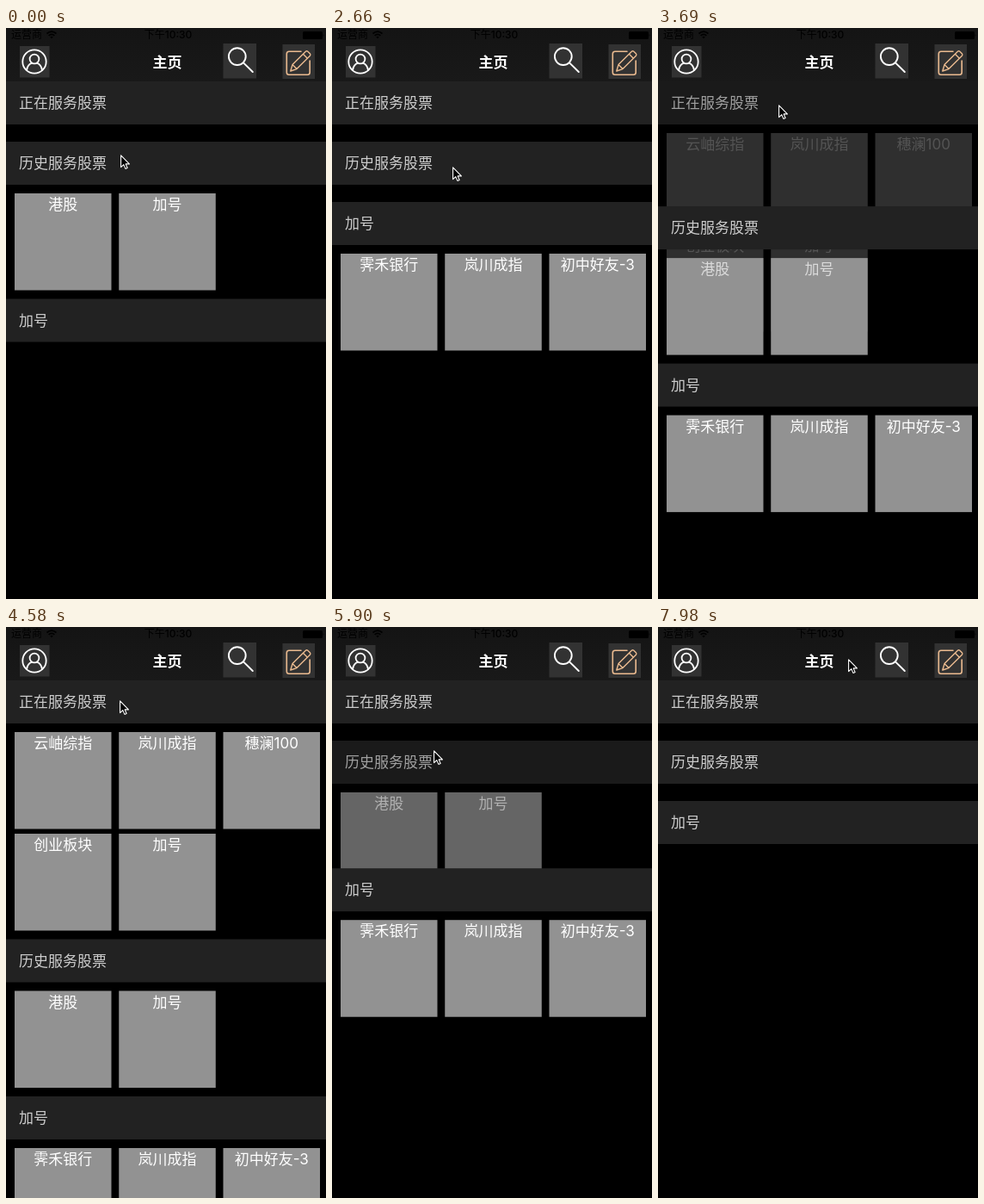
Animation, 372 px wide and 663 px high, one loop 8000 ms. Source, as an HTML page with a canvas:

```html
<!DOCTYPE html>
<html lang="zh-CN">
<head>
<meta charset="utf-8">
<title>主页</title>
<style>
html, body { margin: 0; width: 100%; height: 100%; overflow: hidden; background: #000; }
#stage {
  position: relative; width: 372px; height: 663px; overflow: hidden;
  font: 17px Inter, "Noto Sans CJK SC", "Noto Sans CJK", sans-serif; color: #fff;
}
#stage > * { position: absolute; left: 0; top: 0; }
#nav { width: 372px; height: 62px; background: linear-gradient(#141414, #191919); }
#nav span { position: absolute; left: 0; white-space: nowrap; }
#nav .status { font-size: 12px; line-height: 16px; color: #000; }
#nav .time { width: 377px; text-align: center; font-weight: 500; }
#nav .title { width: 375px; top: 25px; line-height: 30px; text-align: center; font-weight: 600; }
#nav svg { position: absolute; left: 0; top: 0; }
</style>
</head>
<body>
<div id="stage">
  <canvas id="list" width="372" height="663"></canvas>
  <div id="nav">
    <span class="status" style="left:6px">运营商</span>
    <span class="status time">下午10:30</span>
    <span class="title">主页</span>
    <svg width="372" height="62" fill="none" stroke-linecap="round" stroke-linejoin="round">
      <g stroke="#000" stroke-width="1.7" stroke-linecap="butt">
        <path d="M47.5 6.5Q53 1.8 58.5 6.5M49.6 8.9Q53 6 56.4 8.9"/>
        <path d="M51.3 10.4Q53 9 54.7 10.4L53 12.3Z" fill="#000" stroke="none"/>
      </g>
      <rect x="345" y="4" width="23" height="9" rx="1.5" fill="#000"/>
      <path d="M368.7 7Q370.3 8.5 368.7 10Z" fill="#000"/>
      <path d="M16 21H50.5V57.5H16ZM252.5 18H291V58.5H252.5ZM321.5 19H359V59H321.5Z" fill="#323232"/>
      <g stroke="#fff" stroke-width="1.8">
        <circle cx="33" cy="39" r="13.7"/>
        <circle cx="33" cy="36" r="5.4"/>
        <path d="M24 49Q25 42.6 30.2 40.7M35.8 40.7Q41 42.6 42 49"/>
      </g>
      <g stroke="#fff" stroke-width="1.9">
        <circle cx="268.8" cy="33.1" r="9.9"/>
        <path d="M276 40.3L286.8 51"/>
      </g>
      <g stroke="#ebbb90" stroke-width="1.6">
        <path d="M343 27.3H329Q326.3 27.3 326.3 30V51.5Q326.3 54.2 329 54.2H350.5Q353.2 54.2 353.2 51.5V38"/>
        <path d="M330.8 50L333 42.6L348.4 27.2Q349.6 26.2 350.8 27.2L353.4 29.8Q354.4 31 353.4 32.2L338 47.6ZM345.4 30.2L350.4 35.2M333 42.6L338 47.6" stroke-width="1.4"/>
      </g>
    </svg>
  </div>
  <svg id="cursor" width="13" height="19">
    <path d="M.6 .9V14.6L3.8 11.6L5.9 16.4L8.1 15.5L6.1 10.9H10.4Z" fill="#000" stroke="#fff" stroke-width="1.1" stroke-linejoin="round"/>
  </svg>
</div>
<script>
const LOOP = 8000, FADE = 300, HOLD = 600, STEP = 147.5;
const WIDTH = 372, HEIGHT = 663;
const CELL = 112.5, COL = 121.25, ROW = 118, HEAD = 50, PAD = 10;

// Each section flips between open and closed at its tap times.
const sections = [
  { title: '正在服务股票', open: false, taps: [3583, 4795],
    items: ['云岫综指', '岚川成指', '穗澜100', '创业板块', '加号'] },
  { title: '历史服务股票', open: true, taps: [500, 2670, 5800],
    items: ['港股', '加号'] },
  { title: '加号', open: false, taps: [1360, 6690],
    items: ['霁禾银行', '岚川成指', '初中好友-3'] }
];

// The pointer glides from one stop to the next.
const home = { x: 133, y: 147 };
const glides = [
  { at: 750, ms: 580, x: 106, y: 219 },
  { at: 1790, ms: 850, x: 140, y: 161 },
  { at: 2970, ms: 420, x: 140, y: 89 },
  { at: 3850, ms: 880, x: 131, y: 85 },
  { at: 5030, ms: 570, x: 118, y: 143 },
  { at: 5900, ms: 580, x: 80, y: 227 },
  { at: 6800, ms: 700, x: 190, y: 21 },
  { at: 7500, ms: 470, x: 221, y: 37 }
];

const ctx = document.getElementById('list').getContext('2d');
const layer = document.createElement('canvas').getContext('2d');
layer.canvas.width = WIDTH;
layer.canvas.height = HEIGHT;
layer.font = getComputedStyle(document.getElementById('stage')).font;
const cursor = document.getElementById('cursor');

const ease = v => {
  const x = Math.min(1, Math.max(0, v));
  return x * x * (3 - 2 * x);
};

// The screen refreshes in even steps after the opening hold.
function refresh(t) {
  const k = Math.floor((t - HOLD) / STEP + 0.15);
  return k < 0 ? 0 : HOLD + k * STEP;
}

function openness(s, t) {
  const past = s.taps.filter(tap => t >= tap);
  const isOpen = s.open !== (past.length % 2 === 1);
  const p = past.length ? ease((t - past.pop()) / FADE) : 1;
  return isOpen ? p : 1 - p;
}

function grouped(alpha, paint) {
  layer.clearRect(0, 0, WIDTH, HEIGHT);
  paint();
  ctx.globalAlpha = alpha;
  ctx.drawImage(layer.canvas, 0, 0);
  ctx.globalAlpha = 1;
}

function box(x, y, w, h, fill) {
  layer.fillStyle = fill;
  layer.fillRect(x, y, w, h);
}

function label(text, x, y, fill, align) {
  layer.fillStyle = fill;
  layer.textAlign = align;
  layer.fillText(text, x, y);
}

function drawCells(s) {
  grouped(s.p, () => s.items.forEach((name, i) => {
    const x = PAD + (i % 3) * COL;
    const y = s.y + HEAD + PAD + Math.floor(i / 3) * ROW;
    box(x, y, CELL, CELL, '#929292');
    label(name, x + CELL / 2, y + 19, '#fff', 'center');
  }));
}

function drawHead(s) {
  // A crossfade dips midway.
  grouped(1 - s.p * (1 - s.p), () => {
    box(0, s.y, WIDTH, HEAD, '#222');
    label(s.title, 15, s.y + 31, '#ccc', 'left');
  });
}

function drawPointer(t) {
  let { x, y } = home;
  for (const g of glides) {
    const p = ease((t - g.at) / g.ms);
    x += (g.x - x) * p;
    y += (g.y - y) * p;
  }
  cursor.style.transform = `translate(${Math.round(x)}px, ${Math.round(y)}px)`;
}

function draw(t) {
  let y = 62;
  for (const s of sections) {
    const rows = Math.ceil(s.items.length / 3);
    s.p = openness(s, t);
    s.y = y;
    y += HEAD + 2 * PAD + ((rows - 1) * ROW + CELL) * s.p;
  }
  ctx.fillStyle = '#000';
  ctx.fillRect(0, 0, WIDTH, HEIGHT);
  sections.filter(s => s.p === 1).forEach(drawCells);
  sections.filter(s => s.p > 0 && s.p < 1).forEach(drawCells);
  sections.forEach(drawHead);
  drawPointer(t);
}

const start = performance.now();
function tick() {
  draw(refresh((performance.now() - start) % LOOP));
  requestAnimationFrame(tick);
}
tick();
</script>
</body>
</html>
```
